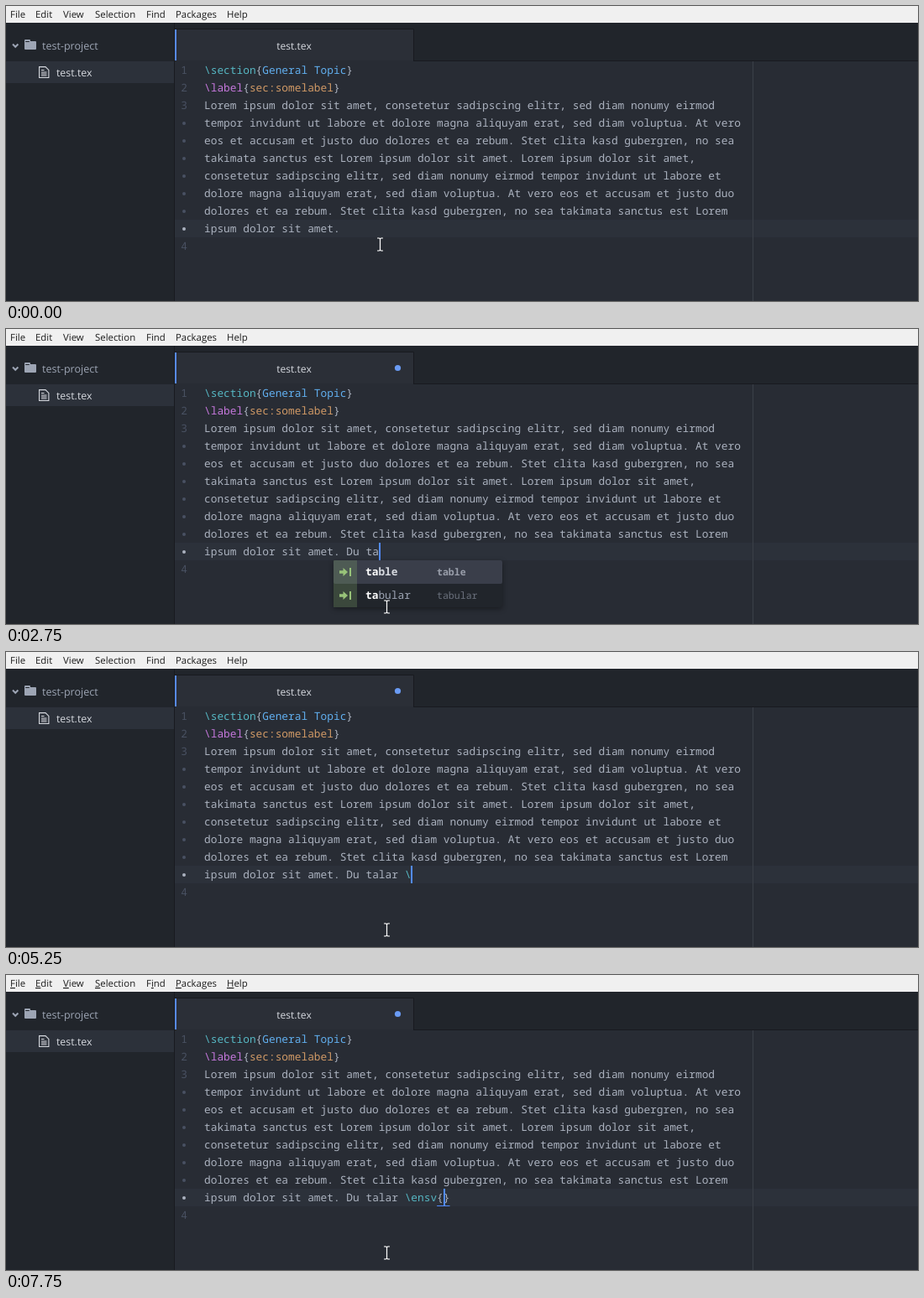
Write an HTML page that moves like this. It is 1086x352 px and loops after 8000 ms.

```html
<!DOCTYPE html>
<html lang="en">
<head>
<meta charset="utf-8">
<title>Editor autocomplete</title>
<style>
html, body { margin: 0; width: 100%; height: 100%; overflow: hidden; background: #282c34; }
svg { display: block; width: 1086px; height: 352px; }
text { white-space: pre; text-rendering: geometricPrecision; }
.ui { font-family: "Open Sans", "Noto Sans", sans-serif; font-size: 12.4px; fill: #d7dae0; }
.menu { font-size: 11.4px; fill: #1c1c1c; }
.alt .key { text-decoration: underline; }
.code { font-family: "Noto Sans Mono", "DejaVu Sans Mono", monospace; font-size: 12.83px; fill: #abb2bf; }
.num { fill: #495162; text-anchor: end; }
.cyan { fill: #56b6c2; } .blue { fill: #61afef; }
.purple { fill: #c678dd; } .orange { fill: #d19a66; }
.word { fill: #9da5b4; }
.label { font-size: 11.55px; fill: #6b717d; }
.selected .word { fill: #d7dae0; font-weight: 700; }
.selected .label { fill: #9a9fab; font-weight: 700; }
.word .hit { fill: #fff; font-weight: 700; }
#popup { filter: drop-shadow(0 2px 3px rgba(0,0,0,.4)); }
</style>
</head>
<body>
<svg id="stage" viewBox="0 0 1086 352" xmlns="http://www.w3.org/2000/svg">
  <rect width="1086" height="352" fill="#282c34"/>
  <rect y="20" width="200" height="332" fill="#21252b"/>
  <rect x="200" y="20" width="886" height="46" fill="#21252b"/>
  <rect y="66" width="200" height="26" fill="#2c313a"/>
  <path d="M200.5 20V352M201 65.5H1086" stroke="#181a1f"/>
  <path d="M201 66V27.5H485.5V66" fill="#2b2f37" stroke="#181a1f"/>
  <rect x="202" y="65" width="283" height="1" fill="#282c34"/>
  <rect x="201" y="28" width="2" height="37" fill="#578af2"/>
  <rect width="1086" height="20" fill="#f0f0f0"/>
  <g id="menu"></g>

  <path d="M8 45.5L11.2 48.8L14.4 45.5" fill="none" stroke="#9da5b4" stroke-width="2"/>
  <path d="M22 41q0-1 1-1h5q1 0 1 1v1h6q1 0 1 1v8q0 1-1 1H23q-1 0-1-1z" fill="#9da5b4"/>
  <path d="M23.2 42.5h4.6" stroke="#21252b"/>
  <text class="ui" x="43" y="52" style="font-size:12.56px;fill:#9da5b4">test-project</text>
  <path d="M39.6 72.6h7.4l3.9 3.8v9.1H39.6zM42 76.5h3.5M42 79h6.5M42 81h6.5M42 83h6.5" fill="none" stroke="#d7dae0" stroke-width="1.1"/>
  <text class="ui" x="60" y="84">test.tex</text>
  <text class="ui" x="343" y="52" text-anchor="middle" style="font-size:12.1px">test.tex</text>
  <circle id="modified" cx="466.5" cy="46.5" r="3.6" fill="#6a9bf4"/>

  <rect x="201" y="255" width="885" height="21" fill="#2c313a"/>
  <rect x="889" y="66" width="1" height="286" fill="#3b4048"/>
  <g id="lines"></g>
  <text id="typed" class="code" y="270"></text>
  <path id="brackets" stroke="#528bff"/>
  <rect id="caret" y="255" width="2" height="21" fill="#528bff"/>
  <g id="popup"></g>
  <path id="beam" d="M-3.5 -7.5H-1L0 -6.5L1 -7.5H3.5M0 -6.5V6.5M-3.5 7.5H-1L0 6.5L1 7.5H3.5" fill="none" stroke="#fff" stroke-width="1.2"/>
  <path id="arrow" transform="translate(443.5 321.5)" d="M0 0V16L3.7 12.6L6.3 18.4L9 17.2L6.5 11.6H11.5Z" fill="#fff" stroke="#111" stroke-width=".9"/>
</svg>
<script>
const $ = id => document.getElementById(id);
const LOOP = 8000, LEFT = 236, CHAR = 7.698, START = 22;
const column = n => LEFT + n * CHAR;
const span = (cls, s) => `<tspan class="${cls}">${s}</tspan>`;
const text = (cls, x, y, s) => `<text class="${cls}" x="${x}" y="${y}">${s}</text>`;

// An underscore marks the access key that follows it.
const menu = { 5: "_File", 35: "_Edit", 68: "_View", 106: "_Selection", 167: "F_ind", 202: "_Packages", 263: "_Help" };
$("menu").innerHTML = Object.entries(menu).map(([x, s]) =>
  text("ui menu", x, 14, s.replace(/_(.)/, (_, c) => span("key", c)))).join("");

const lines = [
  span("cyan", "\\section") + "{" + span("blue", "General Topic") + "}",
  span("purple", "\\label") + "{" + span("orange", "sec:somelabel") + "}",
  "Lorem ipsum dolor sit amet, consetetur sadipscing elitr, sed diam nonumy eirmod",
  "tempor invidunt ut labore et dolore magna aliquyam erat, sed diam voluptua. At vero",
  "eos et accusam et justo duo dolores et ea rebum. Stet clita kasd gubergren, no sea",
  "takimata sanctus est Lorem ipsum dolor sit amet. Lorem ipsum dolor sit amet,",
  "consetetur sadipscing elitr, sed diam nonumy eirmod tempor invidunt ut labore et",
  "dolore magna aliquyam erat, sed diam voluptua. At vero eos et accusam et justo duo",
  "dolores et ea rebum. Stet clita kasd gubergren, no sea takimata sanctus est Lorem",
  "ipsum dolor sit amet.",
  ""
];
$("lines").innerHTML = lines.map((line, i) => {
  const y = 81 + 21 * i, number = i < 3 ? i + 1 : i === 10 ? 4 : 0;
  const mark = number
    ? text("code num", 216, y, number)
    : `<circle cx="212" cy="${y - 4}" r="2" fill="${i === 9 ? "#abb2bf" : "#495162"}"/>`;
  return mark + text("code", LEFT, y, line);
}).join("");
$("typed").setAttribute("x", column(START));

const lists = {
  d: { col: 22, width: 232, labelX: 139, words: ["description"] },
  t: { col: 25, width: 201, labelX: 123, words: ["table", "tabular"] },
  e: { col: 32, width: 216, labelX: 123, words: ["enumerate", "equation"] }
};

// Highlights the letters of the query in order; null when they do not all occur.
function fuzzy(word, query) {
  let i = 0;
  const out = [...word].map(c => c === query[i] ? (i++, span("hit", c)) : c).join("");
  return i === query.length ? out : null;
}

function popup(query) {
  if (!query) return "";
  const { col, width, labelX, words } = lists[query[0]];
  const rows = words.map(w => [w, fuzzy(w, query)]).filter(r => r[1]);
  const x = Math.round(column(col)) - 38;
  const body = rows.map(([word, marked], i) => `
    <g class="${i ? "" : "selected"}" transform="translate(0 ${28 * i})">
      ${i ? "" : `<rect width="${width}" height="28" rx="2" fill="#3a3e4a"/>`}
      <rect width="28" height="28" fill="#98c379" opacity=".22"/>
      <path d="M7 12.3h4.5V9l5.5 5-5.5 5v-3.3H7zM19 9h2v10h-2z" fill="#98c379"/>
      ${text("code word", 38, 18, marked)}
      ${text("code label", labelX, 18, word === "equation" ? "equation(*)" : word)}
    </g>`).join("");
  return `<g transform="translate(${x} 276)"><rect width="${width}" height="${28 * rows.length}" rx="3" fill="#21252b"/>${body}</g>`;
}

// time, typed text, caret shown, popup query
const steps = [
  [0, "", 0], [250, "", 1], [750, "", 0], [1250, "", 1],
  [1500, "D", 1, "d"], [1750, "Du", 1], [2000, "Du ", 1],
  [2500, "Du t", 1, "t"], [2750, "Du ta", 1, "ta"], [3000, "Du tal", 1, "tal"],
  [3500, "Du tala", 1, "tala"], [3750, "Du talar", 1, "talar"],
  [4000, "Du talar ", 1], [4250, "Du talar ", 0], [4750, "Du talar ", 1],
  [5000, "Du talar \\", 1], [5750, "Du talar \\e", 1], [6000, "Du talar \\e", 1, "e"],
  [6250, "Du talar \\en", 1, "e"], [6500, "Du talar \\en", 1, "en"],
  [6750, "Du talar \\ens", 1, "en"], [7000, "Du talar \\ensv", 1],
  [7750, "Du talar \\ensv{}", 1]
];
const within = (t, a, b) => t >= a && t < b;
const show = (id, on) => $(id).style.display = on ? "" : "none";
let current;

function draw(t) {
  const step = steps.findLast(s => s[0] <= t);
  if (step !== current) {
    current = step;
    const [, typed, caret, query] = step;
    const paired = typed.endsWith("}");
    const end = column(START + typed.length - paired);
    $("typed").innerHTML = typed.replace(/\\\w*/, m => span("cyan", m));
    $("caret").setAttribute("x", Math.round(end));
    $("brackets").setAttribute("d", `M${end - CHAR} 275.5h${2 * CHAR}`);
    $("popup").innerHTML = popup(query);
    show("caret", caret);
    show("brackets", paired);
  }
  const pointing = within(t, 3250, 3500);
  show("modified", t >= 2250);
  show("arrow", pointing);
  show("beam", !pointing);
  $("beam").setAttribute("transform", t < 500 ? "translate(445.5 284.5)" : "translate(453.5 331.5)");
  $("menu").classList.toggle("alt", within(t, 4750, 5250) || t >= 7500);
}

const start = performance.now();
function tick() {
  draw((performance.now() - start) % LOOP);
  requestAnimationFrame(tick);
}
tick();
</script>
</body>
</html>
```
